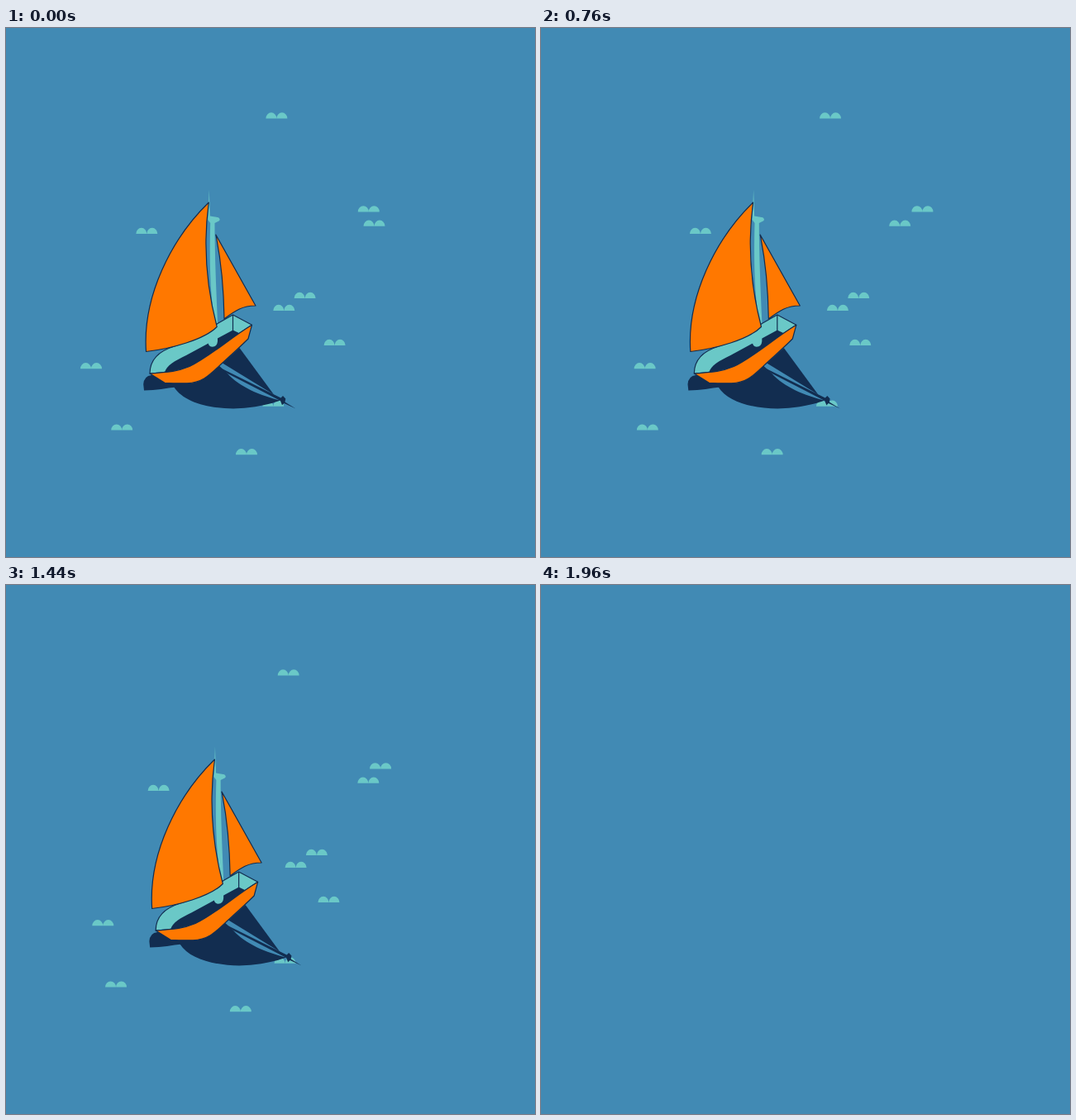
These frames come from a looping animation (640 by 640 pixels, 2 s). An HTML page:

```html
<!DOCTYPE html>
<html lang="en">
<head>
<meta charset="utf-8">
<title>Sailing boat</title>
<style>
html, body { margin: 0; width: 100%; height: 100%; overflow: hidden; background: #418ab4; }
svg { display: block; width: 100%; height: 100%; }
.teal { fill: #6ac8c7; }
.orange { fill: #ff7800; }
.navy { fill: #122d50; }
.line { stroke: #122d50; stroke-width: 1.2; stroke-linejoin: round; }
</style>
</head>
<body>
<svg viewBox="0 0 640 640">
  <g id="scene">
    <g id="fast" class="teal"></g>
    <g id="slow" class="teal"></g>
    <g id="boat">
      <g class="navy">
        <!-- shadow: hull, mainsail, jib, mast -->
        <path d="M167 438.5L166.2 431Q167 421 176 420L215 425L206 434.5C194 435.5 182 438.5 167 438.5Z"/>
        <path d="M203 434C215 453 245 460 275 460.5C300 460 322 454.500 332 450.5C308 445 282 434 268 418L255 406L200 428Z"/>
        <path d="M262 405.500L282.500 387L324 443.500Z"/>
        <path d="M255 409L332.500 447.500L335 445L338.300 448.500L337.500 452.500L350.500 460.500L336.500 454L334 456.300L332 451L268 418Z"/>
      </g>
      <path class="teal" d="M245.800 195.500L246.800 227.500L257 229.300Q260 231.500 257.500 233.500L252.500 236C252.500 280 254.500 320 256.200 361L254 361C248.500 335 245.500 300 247.200 236L244.300 232L245.200 211Z"/>
      <path class="orange line" stroke-width=".8" d="M253.800 250L302 336C286 336 277 342 264 352C263.500 320 260 280 253.800 250Z"/>
      <path class="teal line" d="M174 418C174 402 184 391 204 385C225 379 245 366 256 357.500L274.500 347L297.500 359.300L222 409Q200 417 174 418Z"/>
      <path class="navy" d="M192 417C194 408 204 403 218 396L274.500 365.500L284 370L250 396L222 410Z"/>
      <path class="teal" d="M244.500 376L256 370V379Q255.500 385.500 249.500 385.800Q244.500 385 244.500 380Z"/>
      <path class="line" fill="none" d="M274.500 347V366"/>
      <path class="orange line" d="M174 418C195 416.500 205 416.500 222 409.500C246 398 270 376 297.500 359.300L293 376C282 387 272 396 262 405C246 420 238 429.500 219 429.800Q205 430 192 429.300Z"/>
      <path class="orange line" d="M245.300 211C200 255 165 325 169.500 391.500C200 388 240 377 255.200 361.500C243 315 238 265 245.300 211Z"/>
    </g>
  </g>
</svg>
<script>
const $ = id => document.getElementById(id);
const FRAME = 40, LOOP = 2000, TURN = 960, DRIFT = 14.3;

const wave = ([x, y]) => `<path d="M${x - 13} ${y}a6.5 7.200 0 0 1 13 0a6.500 7.200 0 0 1 13 0z"/>`;
const addWaves = (id, spots) => { $(id).innerHTML = spots.map(wave).join(""); };

addWaves("fast", [
  [327.4, 109.5], [438.8, 222.4], [170.3, 249], [336.3, 342],
  [361.6, 327], [103, 412.3], [323.3, 457.8]
]);
addWaves("slow", [[445.5, 239.8], [397.6, 384], [140.2, 486.6], [291, 516.3]]);

const shift = (id, x) => $(id).setAttribute("transform", `translate(${x})`);

function draw(now) {
  const t = Math.floor(now % LOOP / FRAME) * FRAME;
  const x = DRIFT * (1 - Math.abs(t - TURN) / TURN);
  shift("boat", x);
  shift("fast", 2 * x);
  shift("slow", -x);
  // the sea is empty for the last step of the loop
  $("scene").style.display = t > 2 * TURN ? "none" : "";
}

let start;
function tick(now) {
  start ??= now;
  draw(now - start);
  requestAnimationFrame(tick);
}
draw(0);
requestAnimationFrame(tick);
</script>
</body>
</html>
```
